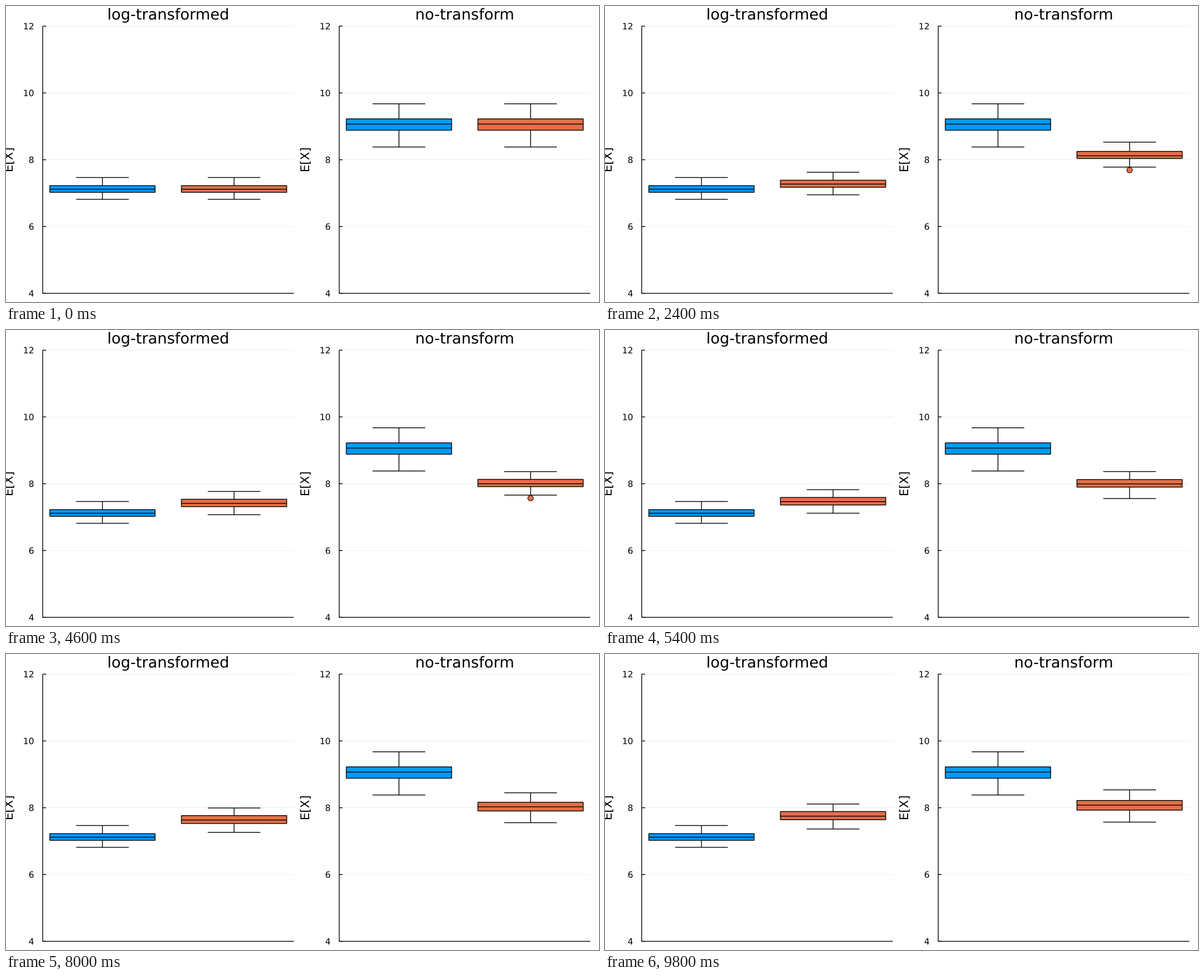
These frames come from a looping animation (1058x529 px, 10000 ms). A matplotlib script:

```python
import numpy as np
import matplotlib.pyplot as plt
from matplotlib.animation import FuncAnimation
from matplotlib.patches import Circle, PathPatch, Rectangle
from matplotlib.textpath import TextPath
from matplotlib.transforms import Affine2D

W, H, DPI = 1058, 529, 100
FRAMES, INTERVAL = 50, 200
PX = 72 / DPI
SCALE = 1.392                 # line width unit in pixels
PT = SCALE * 100 / 72         # font point in pixels
BLUE, ORANGE = "#009AFA", "#E36F47"
LEFT, RIGHT, TOP, BOTTOM = 65.5, 513.5, 36, 513.5
PANEL = W / 2
UNIT = (RIGHT - LEFT) / 1.908  # two boxes 0.8 wide plus 3 % margins
BOX_W, CAP_W = 0.8 * UNIT, 0.4 * UNIT
HALF_TIME = 7                 # frames until half of the drop is done

fig = plt.figure(figsize=(W / DPI, H / DPI), dpi=DPI, facecolor="white")
ax = fig.add_axes([0, 0, 1, 1])
ax.set_xlim(0, W)
ax.set_ylim(H, 0)
ax.axis("off")


def to_y(value):
    return TOP + (12 - value) * (BOTTOM - TOP) / 8


def to_x(slot):
    return LEFT + (slot - 0.546) * UNIT


def line(xs, ys, width=1, **style):
    style = {"color": "black", "solid_capstyle": "butt", "snap": False, **style}
    return ax.plot(xs, ys, lw=width * SCALE * PX, **style)[0]


def text(s, x, y, points, align="center", rotated=False):
    size = points * PT
    path = TextPath((0, 0), s, size=size, prop={"family": "DejaVu Sans"})
    box = path.get_extents()
    shift = (box.x0 + box.x1) / 2 if align == "center" else 0.636 * size * len(s)
    place = Affine2D().translate(-shift, 0).scale(1, -1)
    if rotated:
        place.rotate_deg(-90)
    place.translate(x, y)
    ax.add_patch(PathPatch(place.transform_path(path), fc="black", lw=0))


def panel(x0, title):
    left, right = x0 + LEFT, x0 + RIGHT
    for value in range(4, 13, 2):
        y = to_y(value)
        line([left, right], [y, y], 0.5, alpha=0.1, zorder=1)
        line([left, left + 6], [y, y], zorder=1.5)
        text(str(value), x0 + 50.2, y + 5.7, 8, align="right")
    line([left, left, right], [TOP, BOTTOM, BOTTOM], zorder=1.5)
    text(title, (left + right) / 2, 24.2, 14)
    text("E[X]", x0 + 11.8, (TOP + BOTTOM) / 2, 11, rotated=True)


class BoxPlot:
    def __init__(self, x, color):
        self.x = x
        self.stems = line([], []), line([], [])
        self.caps = line([], []), line([], [])
        self.box = Rectangle((x - BOX_W / 2, 0), BOX_W, 0, fc=color, ec="black",
                             lw=SCALE * PX, zorder=3, snap=False)
        ax.add_patch(self.box)
        self.median = line([], [], zorder=4)
        self.dots = [Circle((x, 0), 4.9, fc=color, ec="black", lw=PX,
                            zorder=5, visible=False) for _ in range(2)]
        for dot in self.dots:
            ax.add_patch(dot)

    def set(self, values, outliers=(False, False)):
        """values: high, q3, median, q1, low; an outlier end becomes a dot."""
        high, q3, median, q1, low = values
        ends = (high, q3, -0.146), (low, q1, 0.09)
        cap_x = [self.x - CAP_W / 2, self.x + CAP_W / 2]
        for (end, edge, gap), stem, cap, dot, out in zip(
                ends, self.stems, self.caps, self.dots, outliers):
            dot.center = (self.x, to_y(end))
            dot.set_visible(out)
            y = to_y(end + gap * out)
            stem.set_data([self.x] * 2, [to_y(edge), y])
            cap.set_data(cap_x, [y, y])
        self.box.set_y(to_y(q3))
        self.box.set_height(to_y(q1) - to_y(q3))
        self.median.set_data([self.x - BOX_W / 2, self.x + BOX_W / 2],
                             [to_y(median)] * 2)


# high, q3, median, q1, low
LOG_START = np.array([7.468, 7.225, 7.116, 7.024, 6.815])
LOG_DRIFT = np.array([0.0131, 0.0135, 0.0129, 0.0126, 0.0112])
RAW_START = np.array([9.675, 9.224, 9.068, 8.884, 8.381])
RAW_DROP = np.array([1.893, 1.744, 1.692, 1.468, 1.138])
RAW_DRIFT = np.array([0.0134, 0.0106, 0.0100, 0.0067, 0.0046])
RAW_POWER = np.array([1.5, 1, 1, 1, 1.2])


def log_values(n):
    return LOG_START + LOG_DRIFT * n


def raw_values(n):
    """Saturating drop that halves at HALF_TIME, plus a slow linear rise."""
    progress = (n / HALF_TIME) ** RAW_POWER
    return RAW_START - RAW_DROP * progress / (1 + progress) + RAW_DRIFT * n


panel(0, "log-transformed")
panel(PANEL, "no-transform")
BoxPlot(to_x(1), BLUE).set(log_values(0))
BoxPlot(to_x(1) + PANEL, BLUE).set(raw_values(0))
log_box = BoxPlot(to_x(2), ORANGE)
raw_box = BoxPlot(to_x(2) + PANEL, ORANGE)


def update(n):
    log_box.set(log_values(n))
    high_out = 1 <= n < 10
    low_out = 4 <= n < 14 or 20 <= n < 27
    raw_box.set(raw_values(n), (high_out, low_out))


anim = FuncAnimation(fig, update, frames=FRAMES, interval=INTERVAL, repeat=True)
plt.show()
```
